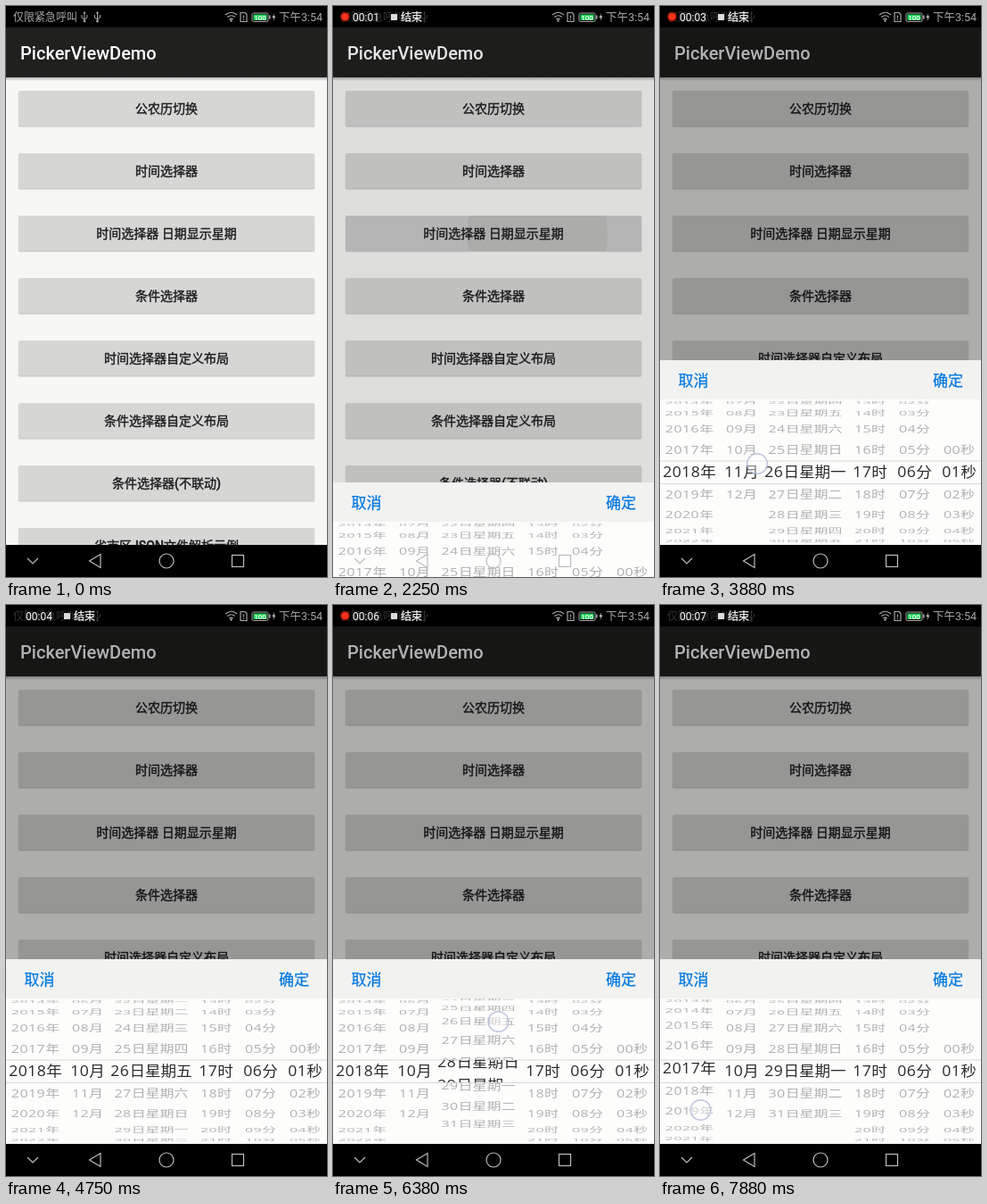
Recreate the animation shown at these times as an HTML page. Size 360x640 px, loop 8 s.

```html
<!DOCTYPE html>
<html lang="zh">
<head>
<meta charset="utf-8">
<title>PickerViewDemo</title>
<style>
  html, body { margin: 0; width: 100%; height: 100%; overflow: hidden; background: #000; }
  svg { display: block; width: 360px; height: 640px; }
  text { font-family: Roboto, 'Noto Sans CJK SC', 'Noto Sans CJK', sans-serif; white-space: pre; }
  .label { font-size: 14px; font-weight: 500; fill: #1e1e1e; stroke: #1e1e1e; stroke-width: .4px; text-anchor: middle; }
  .status { font-size: 12px; fill: #a9a9a9; }
  .action { font-size: 17px; fill: #0479e0; stroke: #0479e0; stroke-width: .25px; text-anchor: middle; }
  .wheel text { font-family: 'Open Sans', 'Noto Sans CJK SC', 'Noto Sans CJK', sans-serif; font-size: 16px; text-anchor: middle; }
  .digits { letter-spacing: .45px; }
  .line { fill: none; stroke: #bdbdbd; stroke-width: 1.2; }
</style>
</head>
<body>
<svg viewBox="0 0 360 640">
  <defs>
    <linearGradient id="drop" x2="0" y2="1">
      <stop stop-color="#000" stop-opacity=".28"/><stop offset="1" stop-color="#000" stop-opacity="0"/>
    </linearGradient>
    <clipPath id="middle"><rect y="510" width="360" height="25"/></clipPath>
    <clipPath id="sides"><path d="M0 441H360V510H0ZM0 535H360V604H0Z"/></clipPath>
    <clipPath id="pressed"><rect x="14" y="235" width="332" height="39.5" rx="2"/></clipPath>
    <g id="usb" class="line" style="stroke:#a9a9a9;stroke-width:1">
      <path d="M0 -5V5M-3 -2V1L0 3L3 1V-2M-1.3 -3.5L0 -5.5L1.3 -3.5"/>
      <circle cy="5" r="1" fill="#a9a9a9"/>
    </g>
  </defs>

  <rect width="360" height="640" fill="#f7f7f6"/>
  <g id="buttons"></g>
  <g clip-path="url(#pressed)">
    <rect id="press" x="14" y="235" width="332" height="40"/>
    <circle id="ripple" cx="229" cy="256"/>
  </g>
  <g id="labels"></g>
  <rect y="24" width="360" height="56" fill="#20201e"/>
  <rect y="80" width="360" height="4" fill="url(#drop)"/>
  <text x="16" y="60" font-size="20" font-weight="500" fill="#fff">PickerViewDemo</text>
  <rect id="dim" y="24" width="360" height="580"/>

  <rect width="360" height="24"/>
  <g id="carrier">
    <text class="status" x="8" y="16.5">仅限紧急呼叫</text>
    <use href="#usb" x="88" y="12"/><use href="#usb" x="102.500" y="12"/>
  </g>
  <g id="recorder">
    <g id="dot"><circle cx="13.500" cy="12" r="5.500" fill="#7a1208"/><circle cx="13.500" cy="12" r="4" fill="#f5321e"/></g>
    <text id="timer" x="22" y="16.500" font-size="12" fill="#fff"></text>
    <rect x="65" y="9" width="7" height="7" fill="#dcdcdc"/>
    <text x="76" y="16.500" font-size="12" fill="#fff" stroke="#fff" stroke-width=".25">结束</text>
  </g>
  <g class="line" style="stroke:#a9a9a9">
    <path d="M246 10Q252.500 4.500 259 10M248.300 12.500Q252.500 9 256.700 12.500M250.400 15Q252.500 13.200 254.600 15"/>
    <path d="M263 7.500H268L270 9.500V17.500H263ZM266.500 10.500V13.500M266.500 14.700V16"/>
  </g>
  <circle cx="252.500" cy="16.500" r="1.200" fill="#a9a9a9"/>
  <rect x="276" y="8" width="18" height="9.500" rx="1.500" fill="none" stroke="#a9a9a9"/>
  <rect x="277.500" y="9.500" width="15" height="6.500" fill="#1fd65a"/>
  <rect x="295" y="10.500" width="1.500" height="4" fill="#a9a9a9"/>
  <text x="285" y="15.600" font-size="8" font-weight="500" fill="#fff" text-anchor="middle">100</text>
  <path d="M301 8L298.500 13H300.300L299.500 17L302.300 11.500H300.500Z" fill="#c8c8c8"/>
  <text class="status" x="306" y="16.500" style="font-size:12.500px">下午3:54</text>

  <rect y="604" width="360" height="36"/>
  <g id="panel">
    <rect y="397" width="360" height="44" fill="#f2f2f1"/>
    <rect y="441" width="360" height="163" fill="#fdfdfc"/>
    <text class="action" x="37.500" y="425.500">取消</text>
    <text class="action" x="323" y="425.500">确定</text>
    <path d="M0 510H360M0 535.500H360" stroke="#d8d8d8"/>
    <g id="outer" class="wheel" clip-path="url(#sides)" fill="#b0b0b0"></g>
    <g id="inner" class="wheel" clip-path="url(#middle)" fill="#2a2a2a"></g>
  </g>
  <g class="line">
    <path d="M24 619L30 625L36 619M93.500 622L106 614.500V629.500Z"/>
    <circle cx="180" cy="622" r="8"/>
    <rect x="253.500" y="615.500" width="13" height="13"/>
  </g>
  <circle id="touch" r="11.300" fill="#fff" fill-opacity=".4" stroke="#b4bbd8" stroke-width="1.500" stroke-opacity=".85"/>
</svg>

<script>
const LOOP = 8000, STEP = 125;
const MID = 522.5, RADIUS = 81.5, ITEM = RADIUS * Math.PI / 10;
const $ = id => document.getElementById(id);

function add(parent, tag, attrs = {}, text = '') {
  const el = document.createElementNS('http://www.w3.org/2000/svg', tag);
  set(el, attrs);
  el.textContent = text;
  return parent.appendChild(el);
}
function set(el, attrs) {
  for (const k in attrs) el.setAttribute(k, attrs[k]);
}
const show = (el, on) => set(el, { visibility: on ? 'visible' : 'hidden' });

// Linear interpolation through [time, value] points
function along(t, points) {
  if (t <= points[0][0]) return points[0][1];
  for (let i = 1; i < points.length; i++) {
    const [t0, a] = points[i - 1], [t1, b] = points[i];
    if (t < t1) return a + (b - a) * (t - t0) / (t1 - t0);
  }
  return points[points.length - 1][1];
}

['公农历切换', '时间选择器', '时间选择器 日期显示星期', '条件选择器', '时间选择器自定义布局',
 '条件选择器自定义布局', '条件选择器(不联动)', '省市区JSON文件解析示例'].forEach((name, i) => {
  const y = 95 + 70 * i, box = { x: 14, width: 332, height: 39.5, rx: 2 };
  add($('buttons'), 'rect', { ...box, x: 13.5, y: y + .5, width: 333, height: 40.5, 'fill-opacity': .08 });
  add($('buttons'), 'rect', { ...box, y: y + .8, 'fill-opacity': .14 });
  add($('buttons'), 'rect', { ...box, y, fill: '#d6d6d5' });
  add($('labels'), 'text', { class: 'label', x: 180, y: y + 24.6 }, name);
});

const two = n => String(n).padStart(2, '0');
const weekday = (month, d) => '日一二三四五六'[new Date(2018, month - 1, d).getDay()];

// Each wheel: centre x, first and last value, unit after the digits
const wheels = [
  { x: 33, min: 1990, max: 2050, unit: () => '年' },
  { x: 91.5, min: 1, max: 12, unit: () => '月' },
  { x: 163, min: 1, max: 31, unit: (d, month) => '日星期' + weekday(month, d) },
  { x: 235.5, min: 0, max: 23, unit: () => '时' },
  { x: 285.5, min: 0, max: 59, unit: () => '分' },
  { x: 335.5, min: 0, max: 59, unit: () => '秒' }
];
function makeRow(parent) {
  const el = add(parent, 'text', { y: 5.8 });
  return { el, digits: add(el, 'tspan', { class: 'digits' }), unit: add(el, 'tspan') };
}
for (const w of wheels) {
  w.rows = Array.from({ length: 11 }, () => [makeRow($('outer')), makeRow($('inner'))]);
}

function drawWheel(w, pos, month) {
  const base = Math.round(pos);
  const max = w === wheels[2] ? new Date(2018, month, 0).getDate() : w.max;
  w.rows.forEach((pair, i) => {
    const value = base + i - 5, angle = (value - pos) * Math.PI / 10;
    const visible = value >= w.min && value <= max && Math.abs(angle) < 1.5;
    pair.forEach((row, inner) => {
      show(row.el, visible);
      if (!visible) return;
      const sy = Math.cos(angle) * (inner ? 1 : .8);
      const y = MID + RADIUS * Math.sin(angle);
      row.digits.textContent = two(value);
      row.unit.textContent = w.unit(value, month);
      set(row.el, { transform: `translate(${w.x} ${y}) scale(${inner ? 1.1 : 1} ${sy})` });
    });
  });
}

// Finger strokes: visible span, x points, y points
const strokes = [
  { from: 1500, to: 2000, x: [[0, 229]], y: [[0, 262]] },
  { from: 3750, to: 4375, x: [[3875, 109], [4250, 113]], y: [[3875, 513], [4000, 518], [4125, 531], [4250, 546]] },
  { from: 5625, to: 6500, x: [[0, 185.5]], y: [[5750, 528], [6375, 467]] },
  { from: 7250, to: 8000, x: [[0, 45.5]], y: [[7250, 544], [7375, 545], [7875, 566]] }
];
const [, monthDrag, dayDrag, yearDrag] = strokes;
const dragged = (stroke, t) => (along(t, stroke.y) - stroke.y[0][1]) / ITEM;

function dragAndSettle(t, stroke, start, end, from, to) {
  const moved = start - dragged(stroke, Math.min(t, from));
  const k = Math.min(1, Math.max(0, (t - from) / (to - from)));
  return moved + (end - moved) * (1 - (1 - k) ** 2);
}

const ticks = [1250, 2375, 3250, 4750, 5250, 6250, 7250];
const dotOff = [[1125, 1625], [3250, 3750], [4750, 5250], [6750, 8000]];

function draw(t) {
  const record = along(t, [[125, 0], [250, .35], [500, 1]]);
  set($('carrier'), { opacity: 1 - .7 * record });
  set($('recorder'), { opacity: record });
  $('timer').textContent = '00:' + two(ticks.filter(s => t >= s).length);
  show($('dot'), !dotOff.some(([a, b]) => t >= a && t < b));

  set($('press'), { opacity: along(t, [[1875, 0], [2000, .05], [2500, .06], [2750, 0]]) });
  set($('ripple'), {
    r: along(t, [[1375, 0], [1750, 25], [2000, 25], [2250, 79], [2500, 240]]),
    opacity: along(t, [[2250, .055], [2750, 0]])
  });

  // The sheet slides up with a decelerating curve
  const left = 1 - Math.min(1, Math.max(0, (t - 2142) / 583));
  const rest = left * left;
  set($('panel'), { transform: `translate(0 ${Math.round(207 * rest)})` });
  show($('panel'), rest < 1);
  set($('dim'), { opacity: along(t, [[2000, 0], [2725, .3]]) });

  const month = t < 4750 ? 11 : 10;
  const at = [
    2018 - dragged(yearDrag, t),
    dragAndSettle(t, monthDrag, 11, 10, 4250, 4500),
    dragAndSettle(t, dayDrag, 26, 29, 6375, 7000),
    17, 6, 1
  ];
  wheels.forEach((w, i) => drawWheel(w, at[i], month));

  const stroke = strokes.find(s => t >= s.from && t < s.to);
  show($('touch'), stroke);
  if (stroke) set($('touch'), { cx: along(t, stroke.x), cy: along(t, stroke.y) });
}

const begin = performance.now();
let last = -1;
function loop() {
  const t = Math.floor((performance.now() - begin) % LOOP / STEP) * STEP;
  if (t !== last) draw(last = t);
  requestAnimationFrame(loop);
}
draw(0);
loop();
</script>
</body>
</html>
```
